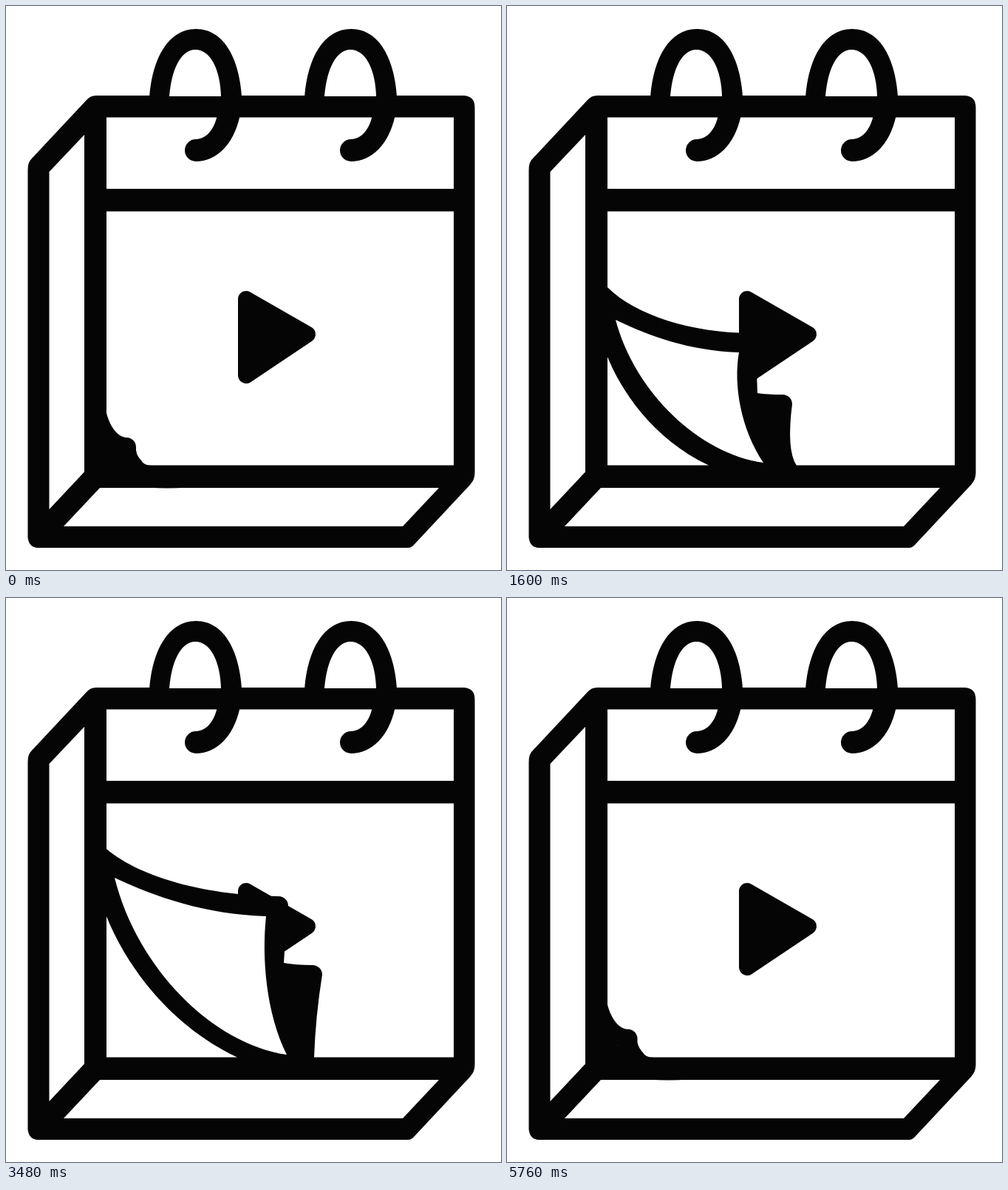
Write an HTML page with a canvas that moves like this. It is 670 px wide and 762 px high and loops after 5800 ms.

```html
<!DOCTYPE html>
<html lang="en">
<head>
<meta charset="utf-8">
<title>Calendar page curl</title>
<style>
html, body { margin: 0; width: 100%; height: 100%; overflow: hidden; background: #fff; }
canvas { display: block; }
</style>
</head>
<body>
<canvas id="stage" width="670" height="762"></canvas>
<script>
const ctx = document.getElementById('stage').getContext('2d');
const INK = '#050505';
const LOOP = 5800, STEP = 40;
const LEFT = 136, FLOOR = 621;

// height at which the curl leaves the left edge, over time
const lift = [
  [0, 550], [600, 527], [840, 503], [1200, 453], [1600, 380], [1800, 345],
  [2280, 324], [2440, 324], [3000, 328.5], [3480, 339], [3600, 342],
  [4200, 371], [4800, 432], [5400, 514], [5800, 550]
];

// top: left start, first corner, notch, second corner, bottom control, bottom end
// flap: left tip, right tip, bottom tip, two edge bends
// gap: left start, bottom end of the uncovered sheet
const poses = [
  { top: [550, 176, 583, 182, 613, 183, 613, 187, 621, 197],
    flap: [150, 605, 150, 605, 150, 605, 0, 0], gap: [621, 136] },
  { top: [503, 214, 550, 224, 591, 226, 593, 240, 607, 283],
    flap: [152, 567, 190, 577, 203, 611, 0, 5], gap: [593, 166] },
  { top: [432, 283, 490, 302, 577, 312, 577, 324, 607, 345],
    flap: [148, 483, 256, 517, 302, 617, 0, 19], gap: [527, 233] },
  { top: [380, 341, 442, 339, 523, 386, 525, 378, 600, 392],
    flap: [147, 424, 314, 468, 347, 617, -8, 3], gap: [474, 273] },
  { top: [339, 382, 403, 376, 493, 428, 496, 419, 565, 417],
    flap: [147, 378, 352, 430, 380, 617, -6, 0], gap: [430, 313] },
  { top: [324, 398, 390, 390, 476, 450, 481, 437, 570, 432],
    flap: [148, 363, 368, 416, 389, 616, -8, -4], gap: [414, 327] }
];

function slope(i) {
  if (i === 0 || i === lift.length - 1) return 0;
  const [a, b, c] = [lift[i - 1], lift[i], lift[i + 1]];
  const d = (b[1] - a[1]) / (b[0] - a[0]);
  const e = (c[1] - b[1]) / (c[0] - b[0]);
  return d * e <= 0 ? 0 : 2 * d * e / (d + e);
}

function liftAt(t) {
  let i = 0;
  while (i < lift.length - 2 && t >= lift[i + 1][0]) i++;
  const [t0, y0] = lift[i], [t1, y1] = lift[i + 1];
  const h = t1 - t0, u = (t - t0) / h, v = 1 - u;
  return y0 * (1 + 2 * u) * v * v + slope(i) * h * u * v * v
    + y1 * u * u * (3 - 2 * u) - slope(i + 1) * h * u * u * v;
}

function poseAt(y) {
  let i = 0;
  while (i < poses.length - 2 && y < poses[i + 1].top[0]) i++;
  const a = poses[i], b = poses[i + 1];
  const k = Math.min(1, Math.max(0, (a.top[0] - y) / (a.top[0] - b.top[0])));
  const mix = key => a[key].map((n, j) => n + (b[key][j] - n) * k);
  return { top: mix('top'), flap: mix('flap'), gap: mix('gap') };
}

function fill(color, draw) {
  ctx.fillStyle = color;
  ctx.beginPath();
  draw();
  ctx.closePath();
  ctx.fill();
}

function polygon(color, ...points) {
  fill(color, () => points.forEach(p => ctx.lineTo(...p)));
}

// cubic whose control points are fractions of the span
function bend(x0, y0, x1, y1, a, b, c, d) {
  const w = x1 - x0, h = y1 - y0;
  ctx.bezierCurveTo(x0 + a * w, y0 + b * h, x0 + c * w, y0 + d * h, x1, y1);
}

function drawBox() {
  fill(INK, () => {
    ctx.moveTo(122, 121);
    ctx.lineTo(620, 121);
    ctx.quadraticCurveTo(634.5, 122, 634.5, 137);
    ctx.lineTo(634.5, 631);
    ctx.quadraticCurveTo(634.5, 640, 628, 647);
    ctx.lineTo(553, 727);
    ctx.quadraticCurveTo(549, 732, 544, 732);
    ctx.lineTo(42, 732);
    ctx.quadraticCurveTo(31, 731, 29.5, 718);
    ctx.lineTo(29.5, 222);
    ctx.quadraticCurveTo(29.5, 211, 34, 207);
    ctx.lineTo(109, 127);
    ctx.quadraticCurveTo(114, 121, 122, 121);
  });
  ctx.fillStyle = '#fff';
  ctx.fillRect(136, 150.5, 470, 96.5);
  ctx.fillRect(136, 277.5, 470, 343);
  polygon('#fff', [106, 174], [106, 629.5], [58.5, 680], [58.5, 224]);
  polygon('#fff', [127, 651], [586, 651], [537, 703], [78, 703]);
}

function drawRing(dx) {
  ctx.save();
  ctx.translate(dx, 0);
  fill(INK, () => {
    ctx.moveTo(194, 123);
    ctx.bezierCurveTo(198, 70, 220, 31, 257, 31);
    ctx.bezierCurveTo(297, 31, 316, 75, 319, 123);
  });
  fill('#fff', () => {
    ctx.moveTo(221, 122);
    ctx.bezierCurveTo(224, 85, 237, 59, 256, 59);
    ctx.bezierCurveTo(278, 59, 290, 88, 291, 122);
  });
  fill(INK, () => {
    ctx.moveTo(316.5, 149);
    ctx.bezierCurveTo(308, 188, 284, 210, 257, 210);
    ctx.arc(257, 195, 15, Math.PI / 2, Math.PI * 1.5);
    ctx.bezierCurveTo(271, 180, 282, 166, 285.5, 149);
  });
  ctx.restore();
}

function drawPlay() {
  ctx.strokeStyle = INK;
  ctx.lineWidth = 22;
  ctx.lineJoin = 'round';
  polygon(INK, [325, 396], [408, 443.5], [325, 499]);
  ctx.stroke();
}

function drawCurl({ top, flap, gap }) {
  const [y, x1, y1, nx, ny, x2, y2, kx, ky, end] = top;
  const r = Math.min(13, Math.max(1, x2 - nx));
  fill(INK, () => {
    ctx.moveTo(LEFT, y);
    bend(LEFT, y, x1 - 13, y1, 0.2, 0.62, 0.6, 0.99);
    ctx.arcTo(x1, y1, x1, y1 + 40, 13);
    ctx.quadraticCurveTo(x1 - (x1 > nx ? 4 : 1), (y1 + 13 + ny) / 2, nx, ny);
    ctx.quadraticCurveTo(nx + 0.4 * (x2 - r - nx), y2, x2 - r, y2);
    ctx.arcTo(x2, y2, x2, y2 + 40, r);
    ctx.quadraticCurveTo(kx, ky, end, FLOOR);
    ctx.lineTo(end, 630);
    ctx.lineTo(LEFT - 4, 630);
    ctx.lineTo(LEFT - 4, y);
  });

  const [ax, ay, dx, dy, ex, ey, m, q] = flap;
  const h = ey - dy;
  fill('#fff', () => {
    ctx.moveTo(ax, ay);
    bend(ax, ay, dx, dy, 0.27, 0.5, 0.6, 0.95);
    ctx.bezierCurveTo(dx + m, dy + 0.3 * h, dx + q, dy + 0.7 * h, ex, ey);
    bend(ex, ey, ax, ay, 0.43, 0.06, 0.87, 0.49);
  });

  const [gy, gx] = gap;
  fill('#fff', () => {
    ctx.moveTo(LEFT, gy);
    bend(LEFT, gy, gx, 620.5, 0.126, 0.295, 0.44, 0.754);
    ctx.lineTo(LEFT, 620.5);
  });
}

// slight sag of the bottom bar while the page lies nearly flat
function drawSag(y) {
  const depth = Math.max(0, (y - 530) / 20) * 2;
  fill(INK, () => {
    ctx.moveTo(192, 650.5);
    ctx.quadraticCurveTo(218, 650.5 + depth, 246, 650.5);
  });
}

function frame(now) {
  const t = Math.floor((now % LOOP) / STEP) * STEP;
  const y = liftAt(t);
  ctx.fillStyle = '#fff';
  ctx.fillRect(0, 0, 670, 762);
  drawBox();
  drawRing(0);
  drawRing(210);
  drawPlay();
  drawCurl(poseAt(y));
  drawSag(y);
  requestAnimationFrame(() => frame(performance.now() - start));
}

const start = performance.now();
frame(0);
</script>
</body>
</html>
```
